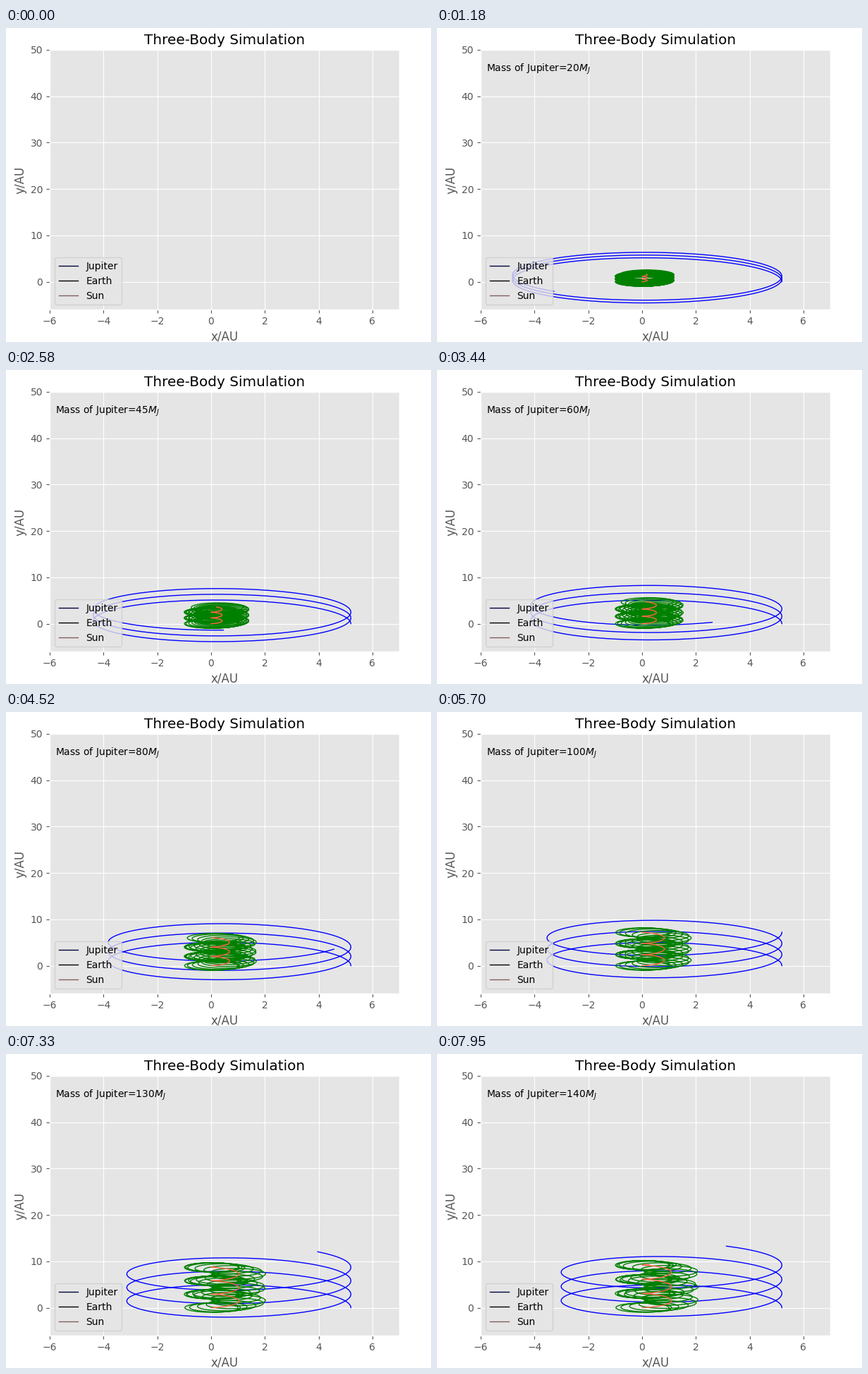
Animation of 603x445 px, one loop 8 s. Source, as a matplotlib script:

```python
import numpy as np
import matplotlib.pyplot as plt
from matplotlib.animation import FuncAnimation
from matplotlib.lines import Line2D

WIDTH, HEIGHT, DPI = 603, 445, 100
LOOP_MS, INTERVAL = 8000, 40

# Moments at which the mass of Jupiter grows by MASS_STEP
STARTS = np.array([80, 310, 630, 860, 1180, 1480, 1710, 2030, 2260, 2580,
                   2890, 3120, 3440, 3740, 3970, 4290, 4520, 4840, 5070, 5390,
                   5700, 5930, 6230, 6550, 6780, 7100, 7330, 7650, 7950])
MASS_STEP = 5
MASSES = MASS_STEP * np.arange(len(STARTS))

# Units: AU, years, solar masses
GM_SUN = 4 * np.pi ** 2
JUPITER_MASS = 9.54e-4
EARTH_MASS = 3e-6
JUPITER_DISTANCE = 5.2
YEARS, DT, KEEP_EVERY = 30, 0.005, 2


def simulate(jupiter_masses):
    """Leapfrog for all masses at once; returns [step, run, body, xy]."""
    runs = len(jupiter_masses)
    gm = np.ones((runs, 3))
    gm[:, 0] = jupiter_masses * JUPITER_MASS
    gm[:, 1] = EARTH_MASS
    gm *= GM_SUN
    pos = np.zeros((runs, 3, 2))
    vel = np.zeros((runs, 3, 2))
    for body, radius in enumerate((JUPITER_DISTANCE, 1.0)):
        pos[:, body, 0] = radius
        vel[:, body, 1] = np.sqrt(GM_SUN / radius)

    def acceleration(p):
        gap = p[:, None, :, :] - p[:, :, None, :]
        dist2 = (gap ** 2).sum(-1) + np.eye(3)
        weight = gm[:, None, :] / (dist2 * np.sqrt(dist2))
        return (gap * weight[..., None]).sum(2)

    track = [pos.copy()]
    acc = acceleration(pos)
    for step in range(1, round(YEARS / DT) + 1):
        vel += acc * DT / 2
        pos += vel * DT
        acc = acceleration(pos)
        vel += acc * DT / 2
        if step % KEEP_EVERY == 0:
            track.append(pos.copy())
    return np.array(track)


tracks = simulate(MASSES)

GREY = "#555555"
plt.rcParams.update({
    "font.family": "DejaVu Sans", "font.size": 10,
    "axes.facecolor": "#E5E5E5", "axes.edgecolor": "white",
    "axes.linewidth": 1, "axes.grid": True, "axes.axisbelow": True,
    "axes.labelsize": "large", "axes.titlesize": "x-large",
    "axes.labelcolor": GREY, "xtick.color": GREY, "ytick.color": GREY,
    "grid.color": "white", "grid.linestyle": "-",
})

fig = plt.figure(figsize=(WIDTH / DPI, HEIGHT / DPI), dpi=DPI, facecolor="white")
ax = fig.add_axes([62 / WIDTH, 46 / HEIGHT, 496 / WIDTH, 368 / HEIGHT])
ax.set(xlim=(-6, 7), ylim=(-6, 50), xticks=range(-6, 7, 2),
       yticks=range(0, 51, 10), xlabel="x/AU", ylabel="y/AU")
ax.set_title("Three-Body Simulation")

trails = [ax.plot([], [], color=color, lw=1)[0]
          for color in ("blue", "green", "tomato")]
mass_label = ax.text(-5.8, 45.4, "", color="black")

legend_colors = {"Jupiter": "#000040", "Earth": "black", "Sun": "#806060"}
ax.legend([Line2D([], [], color=c, lw=1) for c in legend_colors.values()],
          legend_colors, loc="lower left")


def update(frame):
    frame_end = (frame + 1) * INTERVAL - 1
    run = np.searchsorted(STARTS, frame_end, side="right") - 1
    for body, trail in enumerate(trails):
        if run < 0:
            trail.set_data([], [])
        else:
            trail.set_data(*tracks[:, run, body].T)
    mass_label.set_text("" if run < 0 else f"Mass of Jupiter={MASSES[run]}$M_J$")
    return [*trails, mass_label]


anim = FuncAnimation(fig, update, frames=LOOP_MS // INTERVAL,
                     interval=INTERVAL, repeat=True, repeat_delay=0)
plt.show()
```
